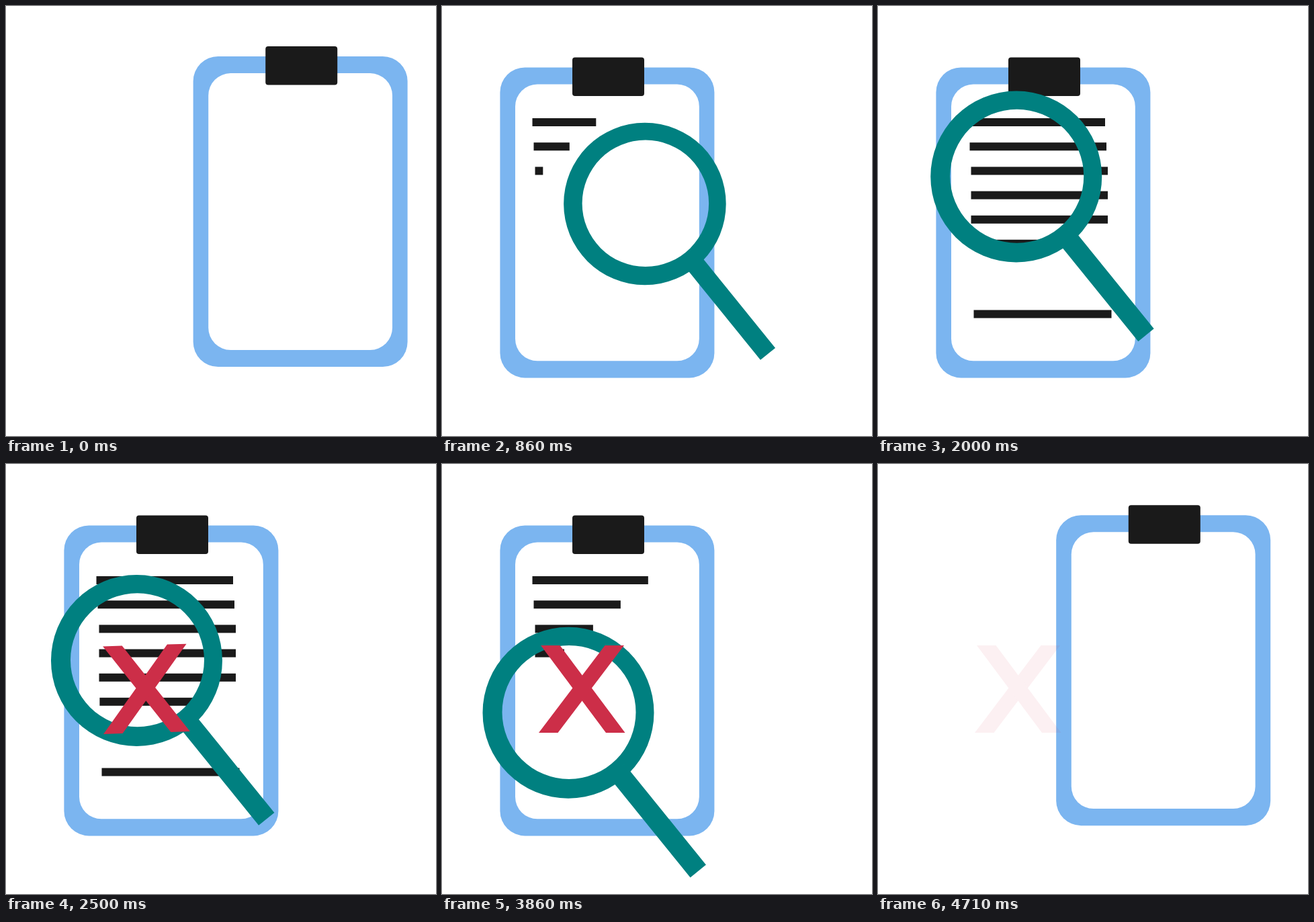
Write an HTML page with a canvas that moves like this. It is 640x640 px and loops after 4780 ms.

```html
<!DOCTYPE html>
<html lang="en">
<head>
<meta charset="utf-8">
<title>Clipboard check</title>
<style>
  html, body { margin: 0; height: 100%; overflow: hidden; background: #fff; }
  canvas { display: block; width: 100vw; height: 100vh; }
</style>
</head>
<body>
<canvas id="stage" width="640" height="640"></canvas>
<script>
const ctx = document.getElementById('stage').getContext('2d');
const LOOP = 4780, LINE_TIME = 483;
const BLUE = '#7bb5f0', INK = '#1a1a1a', TEAL = '#008080', RED = '#cc2e48';

// The lens drifts through these points: time, x, y
const lensPath = [
  [640, 320, 290], [860, 302, 294.5], [1210, 272, 293], [1570, 237.5, 263.5],
  [1790, 214, 243.5], [2500, 194.5, 292.5], [3290, 190, 350.4], [3860, 188, 370.2]
];

const ramp = (t, a, b) => Math.min(1, Math.max(0, (t - a) / (b - a)));
const softRamp = (t, a, b) => {
  const u = ramp(t, a, b);
  return u / 2 + (1 - Math.cos(Math.PI * u)) / 4;
};

// Smooth curve through the points, held at both ends.
function follow(path, time) {
  const last = path.length - 1;
  const t = Math.min(path[last][0], Math.max(path[0][0], time));
  const i = Math.max(0, path.findIndex(p => p[0] >= t) - 1);
  const a = path[i], b = path[i + 1];
  const before = path[Math.max(0, i - 1)], after = path[Math.min(last, i + 2)];
  const span = b[0] - a[0], u = (t - a[0]) / span;
  return [1, 2].map(n => {
    const slope = (p, q) => (q[n] - p[n]) / (q[0] - p[0]) * span;
    const m0 = slope(before, b), m1 = slope(a, after), d = b[n] - a[n];
    return a[n] + u * (m0 + u * (3 * d - 2 * m0 - m1 + u * (m0 + m1 - 2 * d)));
  });
}

function box(x, y, w, h, r, color) {
  ctx.fillStyle = color;
  ctx.beginPath();
  ctx.roundRect(x, y, w, h, r);
  ctx.fill();
}

function drawLine(t, x, y, length, grow, shrink) {
  const part = ramp(t, grow, grow + LINE_TIME) - ramp(t, shrink, shrink + LINE_TIME);
  ctx.fillStyle = INK;
  ctx.fillRect(x, y, length * part, 12);
}

function drawBoard(t) {
  const away = 1 - softRamp(t, 0, 570) + softRamp(t, 4160, LOOP);
  ctx.save();
  ctx.translate(192.4 * away, -16.4 * away);
  box(86.4, 91.4, 319, 462, 37, BLUE);
  box(109, 116.5, 273.8, 411.8, 33, '#fff');
  box(194, 76.5, 107, 57.5, 4, INK);
  for (let i = 0; i < 5; i++) {
    const step = i + (i > 3 ? 1.2 : 0);
    drawLine(t, 134.5 + 2 * Math.min(i, 2), 167 + 36.2 * i, 203.5,
      636 + 98.5 * step, 3787 - 102 * step);
  }
  drawLine(t, 139.4, 347.8, 151, 1272, 3145);
  drawLine(t, 142.5, 452.5, 205, 1346, 3062);
  ctx.restore();
}

function drawLens(t) {
  const scale = .862 + .228 * ramp(t, 640, 1230) - .09 * softRamp(t, 1230, 1560);
  ctx.save();
  ctx.globalAlpha = ramp(t, 600, 780) - ramp(t, 4070, 4500);
  ctx.translate(...follow(lensPath, t));
  ctx.scale(scale, scale);
  ctx.fillStyle = ctx.strokeStyle = TEAL;
  ctx.lineWidth = 30;
  ctx.beginPath();
  ctx.arc(0, 0, 127.5, 0, 7);
  ctx.moveTo(100.5, -.8);
  ctx.arc(1, -.8, 99.5, 0, 7);
  ctx.fill('evenodd');
  ctx.beginPath();
  ctx.moveTo(72, 86);
  ctx.lineTo(193.25, 235.75);
  ctx.stroke();
  ctx.restore();
}

// One slanted bar of the cross, from its top left to its bottom left corner.
function bar(top, bottom) {
  ctx.moveTo(top, -65);
  ctx.lineTo(top + 28.5, -65);
  ctx.lineTo(bottom + 28.5, 65);
  ctx.lineTo(bottom, 65);
  ctx.closePath();
}

function drawCross(t) {
  const swell = softRamp(t, 2480, 3290) - softRamp(t, 3290, 3860);
  const tilt = ramp(t, 2000, 3290) - ramp(t, 3290, 3860);
  const scale = 1 + .26 * swell;
  ctx.save();
  ctx.globalAlpha = ramp(t, 2150, 2450) - ramp(t, 4250, 4745);
  ctx.translate(208 - 1.9 * tilt, 335 - 15.6 * swell);
  ctx.rotate(-4.4 * tilt * Math.PI / 180);
  ctx.scale(scale, scale);
  ctx.fillStyle = RED;
  ctx.beginPath();
  bar(-61, 36);
  ctx.fill();
  if (ctx.globalAlpha < 1) clipOutside(() => bar(-61, 36));
  ctx.beginPath();
  bar(34.5, -64);
  ctx.fill();
  ctx.restore();
}

// Keeps the overlap of faded shapes from being painted twice.
function clipOutside(trace) {
  ctx.beginPath();
  ctx.rect(-100, -100, 200, 200);
  trace();
  ctx.clip('evenodd');
}

function draw(now) {
  const t = now % LOOP;
  ctx.clearRect(0, 0, 640, 640);
  drawBoard(t);
  drawLens(t);
  drawCross(t);
  requestAnimationFrame(draw);
}
requestAnimationFrame(draw);
</script>
</body>
</html>
```
